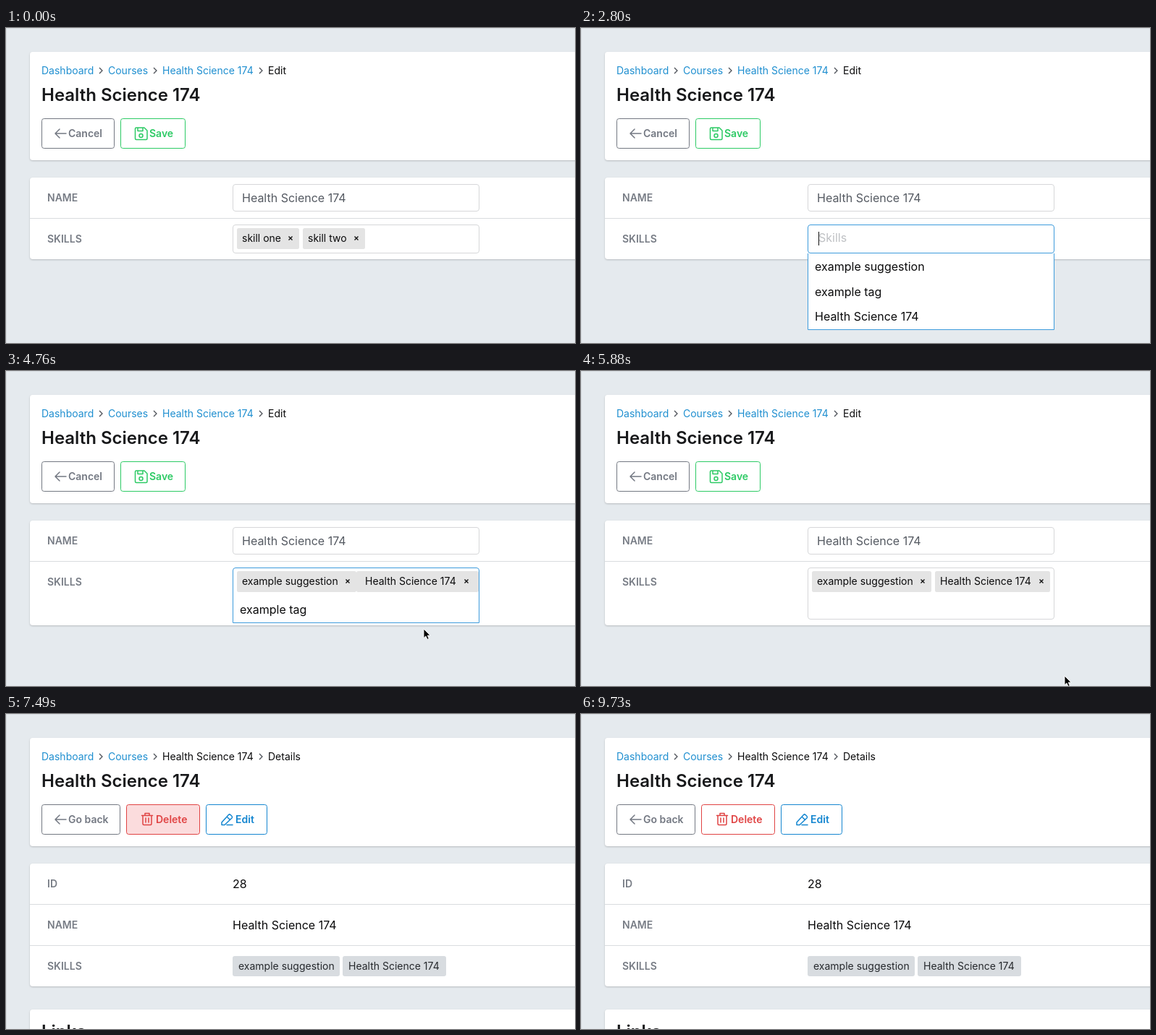
An HTML page for the animation above (9800 ms loop, 786 by 436 pixels).

```html
<!DOCTYPE html>
<html lang="en">
<head>
<meta charset="utf-8">
<title>Course tags</title>
<style>
html, body { margin: 0; width: 100%; height: 100%; overflow: hidden; background: #e5eaee; }
svg { display: block; width: 786px; height: 436px; font: 14px Inter, sans-serif; }
text { fill: #0b0b0c; white-space: pre; }
.link { fill: #1f8fd0; }
.title { font-size: 24px; font-weight: 600; fill: #18191b; }
.label { font-weight: 600; fill: #777c85; }
.big { font-size: 16px; }
.button text { font-weight: 600; fill: currentColor; }
.button rect, .icon { fill: none; stroke: currentColor; }
.icon { stroke-width: 1.5; stroke-linecap: round; stroke-linejoin: round; }
.card { fill: #fff; filter: drop-shadow(0 1px 1px #0003); }
.row { stroke: #d9dcdf; }
.field { fill: #fff; stroke: #d6d7d9; }
.cross { stroke: #111; stroke-width: 1.4; }
.chevron { fill: none; stroke: #4c5057; stroke-width: 1.3; }
.popup { fill: #fff; filter: drop-shadow(0 2px 4px #0003); }
</style>
</head>
<body>
<svg id="stage" viewBox="0 0 786 436">
  <defs><clipPath id="below"><path d="M300 312H700V436H300Z"/></clipPath></defs>
  <path d="M0 .5H786M.5 0V436" stroke="#d8dde1"/>
  <rect class="card" x="33" y="33" width="780" height="150" rx="4"/>
  <g id="crumbs"></g>
  <text class="title" x="49" y="101">Health Science 174</text>
  <g id="edit">
    <rect id="form" class="card" x="33" y="207" width="780" height="113" rx="4"/>
    <path class="row" d="M33 263.5H786"/>
    <text class="label" x="57" y="240">NAME</text>
    <text class="label" x="57" y="297">SKILLS</text>
    <rect class="field" x="313.5" y="216.5" width="340" height="37" rx="3.5"/>
    <text class="big" x="326" y="241" style="fill:#555a62">Health Science 174</text>
    <rect id="skills" class="field" x="313.5" y="272.5" width="340" height="39" rx="3.5"/>
    <g id="tags"></g>
    <g id="prompt">
      <text id="hint" class="big" y="296" style="fill:#bfc1c4">Skills</text>
      <path id="caret" d="M.5 282V301" stroke="#111"/>
    </g>
    <g id="dropdown" clip-path="url(#below)"><g id="list"></g></g>
  </g>
  <g id="details">
    <rect class="card" x="33" y="207" width="780" height="170" rx="4"/>
    <path class="row" d="M33 263.5H786M33 320.5H786"/>
    <text class="label" x="57" y="240">ID</text>
    <text class="label" x="57" y="297">NAME</text>
    <text class="label" x="57" y="354">SKILLS</text>
    <text class="big" x="313" y="241">28</text>
    <text class="big" x="313" y="298">Health Science 174</text>
    <rect x="313" y="335" width="148" height="28" rx="3" fill="#d8dce0"/>
    <rect x="465" y="335" width="143" height="28" rx="3" fill="#d8dce0"/>
    <text x="321" y="354" style="fill:#26292d">example suggestion</text>
    <text x="473" y="354" style="fill:#26292d">Health Science 174</text>
    <rect class="card" x="33" y="409" width="780" height="60" rx="4"/>
    <text class="title" x="49" y="448">Links</text>
  </g>
  <g id="buttons"></g>
  <g id="tooltip">
    <path class="popup" d="M168 85H269a4 4 0 0 1 4 4V111a4 4 0 0 1-4 4H222l-4 4-4-4H168a4 4 0 0 1-4-4V89a4 4 0 0 1 4-4Z"/>
    <text x="171" y="105" style="fill:#33363b">Delete course</text>
  </g>
  <g id="pointer">
    <path id="arrow" d="M0 0V12.6L2.9 9.9 5 14.5 7.2 13.5 5.2 9.1H9.1Z" fill="#000" stroke="#fff" stroke-width=".9"/>
    <g id="beam" fill="none">
      <path d="M-3-7.5Q0-7.5 0-5.5Q0-7.5 3-7.5M0-6V6M-3 7.5Q0 7.5 0 5.5Q0 7.5 3 7.5M-1.5 2H1.5" stroke="#fff" stroke-width="2.6"/>
      <path d="M-3-7.5Q0-7.5 0-5.5Q0-7.5 3-7.5M0-6V6M-3 7.5Q0 7.5 0 5.5Q0 7.5 3 7.5M-1.5 2H1.5" stroke="#000" stroke-width="1.2"/>
    </g>
    <g id="hand">
      <path d="M-1-4.5Q.5-6.5 1.8-4.5L3-1Q4.5-2 5.5-.6 7-1.4 7.8 0 9.6-.4 10 1.6V5.2L8.6 8V10.5H2V8.5L-2 4Q-3.2 2 -.8 2.4L.8 3.4Z" fill="#000" stroke="#fff" stroke-width=".9"/>
      <path d="M3.4 4V7M5.4 4V7M7.4 4V7" stroke="#fff" stroke-width=".7"/>
    </g>
  </g>
</svg>
<script>
const LOOP = 9800, STEP = 70;
const OPEN = 1750, ADD_FIRST = 3710, ADD_SECOND = 4760, BLUR = 5880, SAVED = 7420, LEAVE = 8400;
const $ = id => document.getElementById(id);
const clamp = v => Math.max(0, Math.min(1, v));
const ramp = (t, from, to) => clamp((t - from) / (to - from));
const set = (el, attrs) => { for (const k in attrs) el.setAttribute(k, attrs[k]); };
const show = (el, on) => { el.style.display = on ? '' : 'none'; };

function add(parent, name, attrs = {}, text = '') {
  const el = document.createElementNS('http://www.w3.org/2000/svg', name);
  set(el, attrs);
  el.textContent = text;
  return parent.appendChild(el);
}

// Breadcrumbs
const crumb = (x, text, cls = '') => add($('crumbs'), 'text', { x, y: 64, class: cls }, text);
crumb(49, 'Dashboard', 'link');
crumb(141, 'Courses', 'link');
const course = crumb(216, 'Health Science 174');
const page = crumb(362, 'Edit');
for (const x of [129, 204, 350])
  add($('crumbs'), 'path', { class: 'chevron', d: `M${x} 55l4 4-4 4` });

// Buttons
const icons = {
  back: 'M83 146H68M74 140l-6 6 6 6',
  save: 'M180 138H191l4 4V153a1.5 1.5 0 0 1-1.500 1.500H180a1.500 1.500 0 0 1-1.500-1.500V139.500a1.500 1.500 0 0 1 1.500-1.500M182 138v4.500h7V138M184 149a2.500 2.500 0 1 0 5 0a2.500 2.500 0 1 0-5 0',
  trash: 'M187.500 140.500H202.500M192 140v-2.500h6v2.500M189 140.500V152a1.500 1.500 0 0 0 1.500 1.500H199.500a1.500 1.500 0 0 0 1.500-1.500V140.500M193 144v6M197 144v6',
  pencil: 'M298 150l9.500-10.500a1.800 1.800 0 0 1 2.500 0l2 2a1.800 1.800 0 0 1 0 2.500L302 153.500H298ZM305 142l4.500 4.500M305 153.500H313'
};
function button(x, width, color, icon, textX, text) {
  const g = add($('buttons'), 'g', { class: 'button', color });
  const box = add(g, 'rect', { x: x + .5, y: 125.5, width: width - 1, height: 41, rx: 3 });
  add(g, 'path', { class: 'icon', d: icons[icon] });
  add(g, 'text', { x: textX, y: 151 }, text);
  return { g, box };
}
const cancel = button(49, 101, '#737882', 'back', 86, 'Cancel');
const save = button(158, 90, '#2cca64', 'save', 198, 'Save');
const back = button(49, 109, '#737882', 'back', 86, 'Go back');
const remove = button(166, 102, '#e04343', 'trash', 207, 'Delete');
const modify = button(276, 85, '#1486d0', 'pencil', 317, 'Edit');

// Tags with their lifetimes
function tag(text, x, width, from, to) {
  const g = add($('tags'), 'g');
  const box = add(g, 'rect', { y: 277, height: 29, rx: 2.5, fill: '#e4e4e4' });
  add(g, 'text', { x: x + 7, y: 296 }, text);
  add(g, 'path', { class: 'cross', d: `M${x + width - 14.5} 288.5l5 5m0-5l-5 5` });
  return { g, box, x, width, from, to };
}
const tags = [
  tag('skill one', 319, 86, -1, 2590),
  tag('skill two', 410, 86, -1, 2380),
  tag('example suggestion', 319, 165, ADD_FIRST, LOOP),
  tag('Health Science 174', 489, 159, ADD_SECOND, LOOP)
];

// Suggestions
const panel = add($('list'), 'path', { fill: '#fff', stroke: '#3d9bdc' });
const options = ['example suggestion', 'example tag', 'Health Science 174'].map(text => {
  const box = add($('list'), 'rect', { x: 315, width: 337, height: 33, rx: 2 });
  return { text, box, label: add($('list'), 'text', { x: 323, class: 'big' }, text) };
});

// Pointer way points: time, x, y
const way = [
  [1260, 743, 408], [1610, 616, 290], [3150, 616, 290], [3500, 580, 331], [4200, 580, 331],
  [4480, 577, 357], [5180, 577, 357], [5670, 668, 422], [6300, 668, 422], [6930, 206, 146],
  [LEAVE, 206, 146], [9100, 800, 440]
];
function pointerAt(t) {
  let i = 0;
  while (i < way.length - 2 && t >= way[i + 1][0]) i++;
  const [a, b] = [way[i], way[i + 1]];
  const k = ramp(t, a[0], b[0]), e = k * k * (3 - 2 * k);
  return { x: a[1] + (b[1] - a[1]) * e, y: a[2] + (b[2] - a[2]) * e };
}
const inside = (p, x, y, w, h) => p.x >= x && p.x <= x + w && p.y >= y && p.y <= y + h;

function drawForm(t, p) {
  const focused = t >= OPEN && t < BLUR, wrapped = t >= ADD_SECOND;
  set($('form'), { height: wrapped ? 145 : 113 });
  set($('skills'), { height: wrapped ? 71 : 39 });
  $('skills').style.stroke = focused ? '#3d9bdc' : '';

  let end = 315;
  for (const { g, box, x, width, from, to } of tags) {
    const on = t >= from && t < to;
    const bump = from > 0 && t - from < STEP ? 5 : 0;
    show(g, on);
    set(box, { x: x - bump, width: width + 2 * bump });
    if (on) end = x + width;
  }

  show($('prompt'), focused && !wrapped);
  set($('prompt'), { transform: `translate(${end + 13} 0)` });
  $('hint').style.opacity = .65 + .35 * ramp(t, OPEN, OPEN + STEP);
  const typed = [OPEN, 2380, 2590, ADD_FIRST].filter(v => v <= t).pop() || 0;
  show($('caret'), (t - typed) % 1000 < 500);

  show($('dropdown'), focused);
  const left = options.filter(o => !(o.text === 'example suggestion' && t >= ADD_FIRST) &&
    !(o.text === 'Health Science 174' && wrapped));
  set(panel, { d: `M313.5 290V${314 + 34.5 * left.length}H653.5V290` });
  set($('list'), { transform: `translate(0 ${-5 * (1 - ramp(t, OPEN, OPEN + STEP))})` });
  for (const o of options) {
    const row = left.indexOf(o), y = 314 + 34.5 * row;
    const active = row >= 0 && t > 3150 && inside(p, 315, y, 337, 34);
    show(o.box, row >= 0);
    show(o.label, row >= 0);
    set(o.box, { y, fill: active ? '#3595f6' : '#fff' });
    set(o.label, { y: y + 22 });
    o.label.style.fill = active ? '#fff' : '';
  }
  return focused && inside(p, 313, 312, 341, 2 + 34.5 * left.length);
}

function draw(t) {
  const editing = t < SAVED, p = pointerAt(t);
  for (const el of [$('edit'), cancel.g, save.g]) show(el, editing);
  for (const el of [$('details'), back.g, remove.g, modify.g]) show(el, !editing);
  set(course, { class: editing ? 'link' : '' });
  page.textContent = editing ? 'Edit' : 'Details';

  const overList = editing && drawForm(t, p);
  const overSave = editing && t > 6300 && inside(p, 158, 125, 90, 42);
  const overDelete = !editing && inside(p, 166, 125, 102, 42);
  const overEdit = !editing && inside(p, 276, 125, 85, 42);
  save.box.style.fill = overSave ? '#dbfce4' : '';
  remove.box.style.fill = overDelete ? '#fbdcdd' : '';
  modify.box.style.fill = overEdit ? '#dceefb' : '';
  $('tooltip').style.opacity = overDelete ? ramp(t, 7490, 7700) : 0;

  const typing = t >= 2310 && t < 3150;
  show($('pointer'), t >= 1260 && !typing && (editing || t > LEAVE) && t < 9100);
  set($('pointer'), { transform: `translate(${p.x} ${p.y})` });
  const hand = overList || overSave || overDelete || overEdit;
  const beam = editing && !hand && (inside(p, 313, 216, 341, 38) ||
    inside(p, 313, 272, 341, t >= ADD_SECOND ? 72 : 40));
  show($('hand'), hand);
  show($('beam'), beam);
  show($('arrow'), !hand && !beam);
}

const start = performance.now();
function tick() {
  const t = (performance.now() - start) % LOOP;
  draw(Math.floor(t / STEP) * STEP);
  requestAnimationFrame(tick);
}
tick();
</script>
</body>
</html>
```
